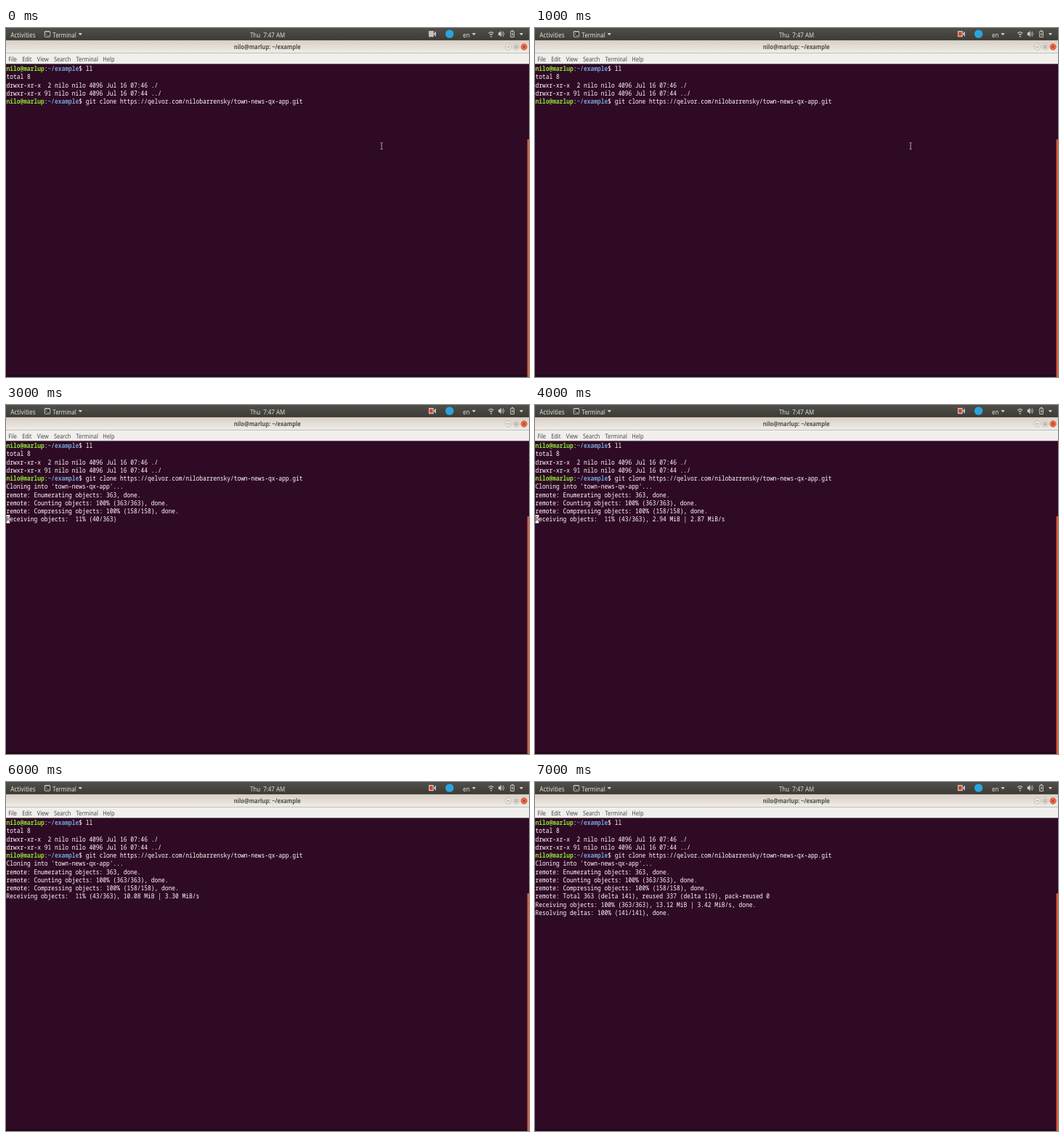
These frames come from a looping animation (720 by 480 pixels, 8 s). An HTML page:

```html
<!DOCTYPE html>
<html lang="en">
<head>
<meta charset="utf-8">
<title>Terminal clone</title>
<style>
  html, body { margin: 0; width: 100%; height: 100%; overflow: hidden; background: #2f0a24; }
  svg { display: block; width: 100vw; height: 100vh; }
  text { white-space: pre; text-rendering: geometricPrecision; font-family: "Noto Sans", sans-serif; }
  .bar text { fill: #e2dfd8; font-size: 15px; }
  .menu text { fill: #4c4c4c; font-size: 14.1px; }
  .title { fill: #504d48; font-size: 14.3px; font-weight: 700; text-anchor: middle; }
  #term text { fill: #fff; font: 500 15px "Noto Sans Mono", monospace; }
  #term .user { fill: #8ae234; font-weight: 700; }
  #term .path { fill: #729fcf; font-weight: 700; }
  #term .under { fill: #300a24; }
</style>
</head>
<body>
<!-- A 1366 x 768 desktop squeezed onto the stage -->
<svg viewBox="0 0 1366 768" preserveAspectRatio="none">
  <defs>
    <linearGradient id="panel" x2="0" y2="1">
      <stop stop-color="#504f49"/><stop offset="1" stop-color="#3c3b37"/>
    </linearGradient>
    <linearGradient id="head" x2="0" y2="1">
      <stop stop-color="#d8cfc5"/><stop offset="1" stop-color="#f0ede8"/>
    </linearGradient>
  </defs>

  <rect width="1366" height="768" fill="#2f0a24"/>
  <rect y="763" width="1366" height="5" fill="#26081e"/>
  <rect x="1361.5" y="245" width="4.5" height="523" fill="#dc5c37"/>

  <g class="bar">
    <rect width="1366" height="27" fill="url(#panel)"/>
    <text x="12" y="20" style="font-size:15.6px">Activities</text>
    <text x="122" y="20">Terminal</text>
    <text x="683" y="20" text-anchor="middle">Thu  7:47 AM</text>
    <text x="1193.5" y="20">en</text>
    <path fill="#d3d0c9" d="M189 11h10l-5 5.5zM1217 11h10l-5 5.5zM1341 11h10l-5 5.5z"/>
    <rect x="101" y="7.5" width="14" height="12" rx="1" fill="#34332f" stroke="#d3d0c9" stroke-width="1.6"/>
    <path d="M101 8.5h14M103.5 11.5l3 2-3 2M108 16.5h4" fill="none" stroke="#d3d0c9" stroke-width="1.4"/>
    <path fill="#c4c1ba" d="M1104 6.5h13v13h-13zM1117.5 12l5.5-5v12l-5.5-5z"/>
    <rect id="rec" x="1106.5" y="9" width="8" height="8" fill="#e2341d"/>
    <ellipse cx="1158.5" cy="13" rx="10.8" ry="9.1" fill="#2ba4de"/>
    <g fill="none" stroke="#d3d0c9" stroke-width="2">
      <path d="M1260.5 11.5q6.5-5 13 0M1263.5 15q3.5-3 7 0"/>
      <path d="M1267 17v3" stroke-width="3"/>
      <path d="M1295 10q3 3 0 6.5M1298 7.5q5.5 5.5 0 11.5" stroke-width="1.5"/>
      <path d="M1318 7.5h9v12.5h-9zM1320.5 5.5h4" stroke-width="1.6"/>
    </g>
    <path fill="#d3d0c9" d="M1286 10h3l4-4v14l-4-4h-3zM1324 9l-4 5.5h2.5l-1 4 4-5.5h-2.5z"/>
  </g>

  <rect y="27" width="1366" height="28" fill="url(#head)"/>
  <text class="title" x="682.5" y="46">nilo@marlup: ~/example</text>
  <g stroke-width="1.3">
    <ellipse cx="1312" cy="41.5" rx="7.6" ry="6.6" fill="#ece8e2" stroke="#b8b0a5"/>
    <ellipse cx="1332.5" cy="41.5" rx="7.6" ry="6.6" fill="#ece8e2" stroke="#b8b0a5"/>
    <ellipse cx="1353" cy="41.5" rx="7.8" ry="6.8" fill="#ee6a42" stroke="#d2532f"/>
    <path d="M1308.5 41.5h7M1329.5 39h6v5h-6z" fill="none" stroke="#77716a"/>
    <path d="M1350 39l6 5m0-5l-6 5" stroke="#7d2c16"/>
  </g>

  <g class="menu">
    <rect y="55" width="1366" height="24" fill="#f1efec"/>
    <text x="6" y="73">File</text>
    <text x="42" y="73">Edit</text>
    <text x="81" y="73">View</text>
    <text x="125" y="73">Search</text>
    <text x="183" y="73">Terminal</text>
    <text x="253" y="73">Help</text>
  </g>

  <g id="term"></g>
  <path id="pointer" d="M978 252.5h2l1 1 1-1h2M981 253.5v12M978 266.5h2l1-1 1 1h2" fill="none" stroke="#c9c2c7" stroke-width="1.5"/>
</svg>

<script>
const LOOP = 8000, ROW = 18, TOP = 80, COL = 9;
const $ = id => document.getElementById(id);

const prompt = '<tspan class="user">nilo@marlup</tspan>:<tspan class="path">~/example</tspan>$ ';
const repo = 'town-news-qx-app';
const shell = [
  prompt + 'll',
  'total 8',
  'drwxr-xr-x  2 nilo nilo 4096 Jul 16 07:46 ./',
  'drwxr-xr-x 91 nilo nilo 4096 Jul 16 07:44 ../',
  prompt + `git clone https://qelvor.com/nilobarrensky/${repo}.git`
];
const cloning = [...shell, `Cloning into '${repo}'...`];
const remote = [
  ...cloning,
  'remote: Enumerating objects: 363, done.',
  'remote: Counting objects: 100% (363/363), done.',
  'remote: Compressing objects: 100% (158/158), done.'
];
const receive = status => [...remote, 'Receiving objects: ' + status];
const done = [
  ...remote,
  'remote: Total 363 (delta 141), reused 337 (delta 119), pack-reused 0',
  'Receiving objects: 100% (363/363), 13.12 MiB | 3.42 MiB/s, done.',
  'Resolving deltas: 100% (141/141), done.'
];

const steps = [
  { at: 0, lines: shell, pointer: true },
  { at: 1000, lines: shell, pointer: true, rec: true },
  { at: 2000, lines: cloning, rec: true },
  { at: 3000, lines: receive(' 11% (40/363)'), rec: true, cursor: true },
  { at: 4000, lines: receive(' 11% (43/363), 2.94 MiB | 2.87 MiB/s'), rec: true, cursor: true },
  { at: 5000, lines: receive(' 11% (43/363), 6.20 MiB | 3.03 MiB/s'), rec: true, cursor: true },
  { at: 6000, lines: receive(' 11% (43/363), 10.08 MiB | 3.30 MiB/s'), rec: true },
  { at: 7000, lines: done, rec: true }
];

const show = (id, on) => $(id).setAttribute('visibility', on ? 'visible' : 'hidden');
const textAt = (row, body, cls = '') =>
  `<text class="${cls}" x="1" y="${TOP + row * ROW + 14.5}">${body}</text>`;

function render({ lines, cursor, pointer, rec }) {
  let out = lines.map((line, row) => textAt(row, line)).join('');
  if (cursor) {
    const row = lines.length - 1;
    out += `<rect x="1" y="${TOP + row * ROW}" width="${COL}" height="${ROW}" fill="#fff"/>`;
    out += textAt(row, lines[row][0], 'under');
  }
  $('term').innerHTML = out;
  show('pointer', pointer);
  show('rec', rec);
}

let current;
const start = performance.now();
function tick() {
  const t = (performance.now() - start) % LOOP;
  const step = steps.findLast(s => s.at <= t);
  if (step !== current) render(current = step);
  requestAnimationFrame(tick);
}
tick();
</script>
</body>
</html>
```
